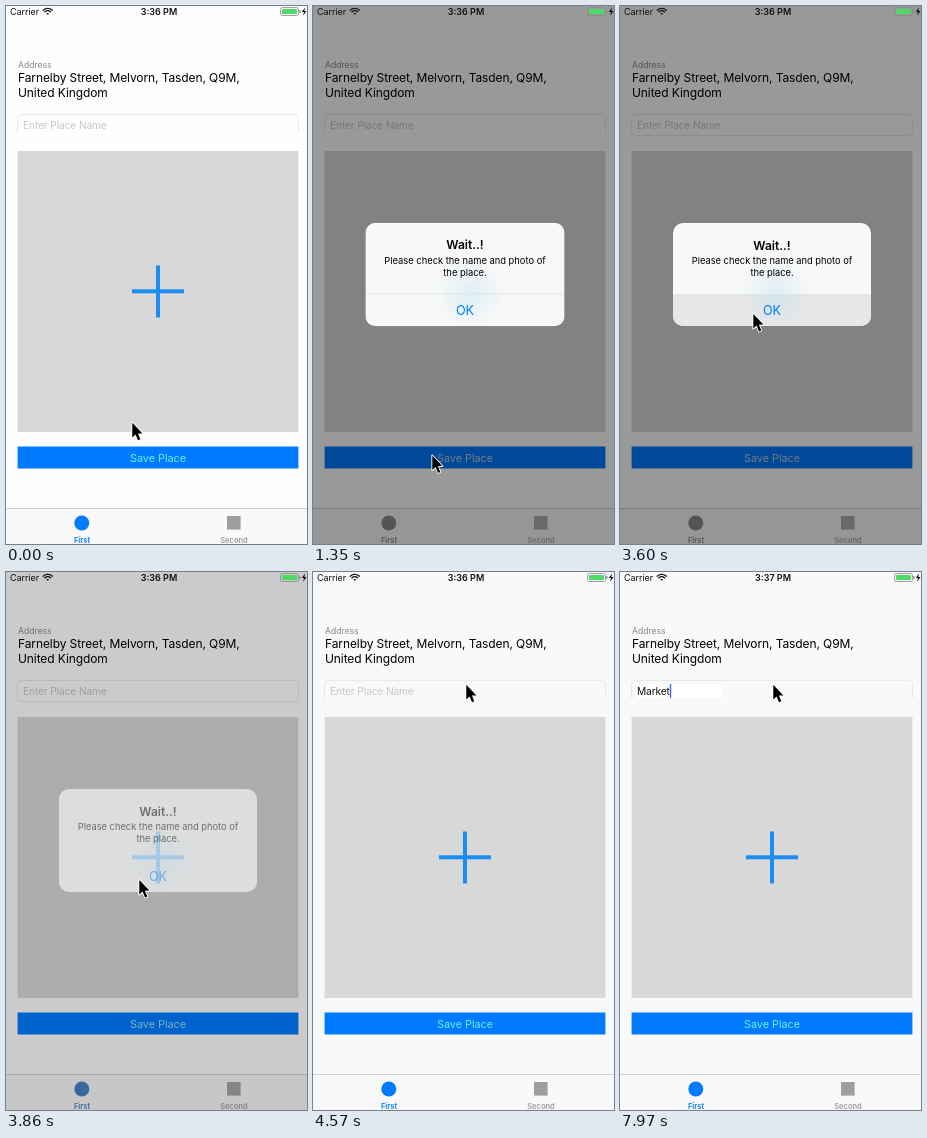
Write an HTML page with a canvas that moves like this. It is 301 by 538 pixels and loops after 8000 ms.

```html
<!DOCTYPE html>
<html lang="en">
<head>
<meta charset="utf-8">
<title>Save place form</title>
<style>
html, body { margin: 0; width: 100%; height: 100%; overflow: hidden; background: #fff; }
canvas { display: block; width: 301px; height: 538px; }
</style>
</head>
<body>
<canvas id="stage"></canvas>
<script>
const W = 301, H = 538, LOOP = 8000, TICK = 87;
const FONT = 'Inter, "Liberation Sans", sans-serif';
const PRESS = 900, OPEN = 1350, OK_DOWN = 3600, CLOSE = 3860, CLOSED = 4040;
const FOCUS = 5110, MINUTE = 6370;
const WORD = 'Market', KEYS = [6550, 6910, 7170, 7440, 7520, 7970];

// Pointer: each move starts where the last one ended
const HOME = { x: 125.8, y: 416.8 };
const MOVES = [
  { start: 90, steps: 6, via: { x: 126, y: 437 }, to: { x: 118.8, y: 449.5 } },
  { start: 2250, steps: 5, via: { x: 109, y: 370 }, to: { x: 132.8, y: 308 } },
  { start: 4220, steps: 5, via: { x: 135, y: 180 }, to: { x: 152.8, y: 112.8 } }
];

const canvas = document.getElementById('stage');
const dpr = window.devicePixelRatio || 1;
canvas.width = W * dpr;
canvas.height = H * dpr;
const ctx = canvas.getContext('2d');

const clamp = v => Math.max(0, Math.min(1, v));
const ease = x => x * x * (3 - 2 * x);
const mix = (a, b, k) => `rgb(${a.map((v, i) => Math.round(v + (b[i] - v) * k))})`;

function rect(x, y, w, h, color) {
  ctx.fillStyle = color;
  ctx.fillRect(x, y, w, h);
}

function round(x, y, w, h, r) {
  ctx.beginPath();
  ctx.roundRect(x, y, w, h, r);
}

function poly(points) {
  ctx.beginPath();
  points.forEach(p => ctx.lineTo(p[0], p[1]));
  ctx.closePath();
}

function setFont(size, weight = 400, gap = 0) {
  ctx.font = `${weight} ${size}px ${FONT}`;
  ctx.letterSpacing = gap + 'px';
}

function text(s, x, y, size, color, { weight, align = 'left', gap } = {}) {
  setFont(size, weight, gap);
  ctx.textAlign = align;
  ctx.fillStyle = color;
  ctx.fillText(s, x, y);
}

function pointerAt(t) {
  let pos = HOME;
  for (const { start, steps, via, to } of MOVES) {
    if (t < start) break;
    const n = Math.min(steps, Math.floor((t - start) / TICK) + 1);
    const u = ease(n / steps), v = 1 - u, from = pos;
    const along = k => v * v * from[k] + 2 * u * v * via[k] + u * u * to[k];
    pos = { x: along('x'), y: along('y') };
  }
  return pos;
}

// How much of the alert is present, 0 to 1
function presence(t) {
  if (t < OPEN || t >= CLOSED) return 0;
  if (t < CLOSE) return 1;
  const step = Math.floor((t - CLOSE) / 90) + 1;
  return (1 - step / 3) ** 1.7;
}

// Shown on focus, one soft blink, then solid while typing
function caretAlpha(t) {
  return t < FOCUS ? 0 : clamp((Math.abs(t - 5875) - 180) / 90);
}

function drawStatus(t) {
  const ink = '#111', frame = '#888';
  text('Carrier', 4, 9, 9, ink, { gap: -0.05 });
  text(t < MINUTE ? '3:36 PM' : '3:37 PM', 153, 9, 9, ink, { weight: 600, align: 'center' });

  ctx.strokeStyle = ctx.fillStyle = ink;
  ctx.lineWidth = 1.4;
  for (const r of [1.3, 4.2, 6.6]) {
    ctx.beginPath();
    ctx.arc(41.7, 9, r, -Math.PI * 0.77, -Math.PI * 0.23);
    ctx.stroke();
  }

  round(274.5, 1.5, 18, 8, 2);
  ctx.lineWidth = 0.8;
  ctx.strokeStyle = frame;
  ctx.stroke();
  round(276, 3, 15, 5, 1);
  ctx.fillStyle = '#4cd964';
  ctx.fill();
  rect(293.3, 4, 1.2, 3, frame);
  poly([[299, 1.5], [295.8, 6], [298, 6], [297, 9.8], [300.6, 5], [298.4, 5]]);
  ctx.fillStyle = ink;
  ctx.fill();
}

function drawField(t) {
  const closed = t >= OK_DOWN && t < CLOSED;
  ctx.save();
  ctx.beginPath();
  ctx.rect(0, 100, W, closed ? 40 : 27);
  ctx.clip();
  round(11.5, 108.5, 281, 21, 4);
  ctx.lineWidth = 1;
  ctx.strokeStyle = '#e9e9e9';
  ctx.stroke();
  ctx.restore();

  const size = 10.2, gap = -0.12, base = 122.7;
  const typed = WORD.slice(0, KEYS.filter(k => t >= k).length);
  if (typed) {
    rect(16, 112, 85, 14, '#fff');
    text(typed, 17, base, size, '#111', { gap });
  } else {
    text('Enter Place Name', 17, base, size, '#c7c7cd', { gap });
  }
  setFont(size, 400, gap);
  ctx.globalAlpha = caretAlpha(t);
  rect(17 + ctx.measureText(typed).width, 112, 1.4, 14, '#426bf2');
  ctx.globalAlpha = 1;
}

function drawTabs(dim) {
  const tint = mix([0, 122, 255], [140, 140, 140], dim);
  const idle = mix([158, 158, 158], [174, 174, 174], dim);
  const label = { weight: 600, align: 'center' };
  rect(0, 502, W, 36, '#f9f9f9');
  rect(0, 502, W, 1, '#cfcfcf');
  ctx.beginPath();
  ctx.arc(75.8, 517, 7.5, 0, Math.PI * 2);
  ctx.fillStyle = tint;
  ctx.fill();
  rect(221, 510, 13.6, 13.6, idle);
  text('First', 76, 537.2, 7.5, tint, label);
  text('Second', 228, 537.2, 7.5, idle, label);
}

function drawPage(t, dim) {
  rect(0, 0, W, H, t < CLOSED ? '#fefefe' : '#f9f9f9');
  text('Address', 12, 61.5, 8.6, '#8a8a8a');
  text('Farnelby Street, Melvorn, Tasden, Q9M,', 12, 76, 12, '#000', { gap: -0.1 });
  text('United Kingdom', 12, 90.6, 12, '#000', { gap: -0.1 });
  drawField(t);

  rect(11.6, 145, 280.8, 281, '#d8d8d8');
  rect(126, 283.3, 52, 4, '#1b8cf0');
  rect(150, 259.5, 4, 52, '#1b8cf0');

  const pressed = t >= PRESS && t < OPEN;
  const label = pressed ? '#3395ff' : mix([104, 240, 255], [190, 206, 214], dim);
  rect(11.6, 440.5, 280.8, 22, '#007aff');
  text('Save Place', 152, 455.7, 10.8, label, { align: 'center' });
  drawTabs(dim);
}

function drawAlert(t, shown) {
  const pressed = t >= OK_DOWN && t < CLOSE;
  const scale = 1 + 0.006 * clamp(1 - (t - OPEN) / 180);
  ctx.save();
  ctx.translate(152, 268.5);
  ctx.scale(scale, scale);
  ctx.translate(-152, -268.5);

  // The panel fades later than its text
  ctx.globalAlpha = 1 - (1 - shown) ** 1.5;
  ctx.save();
  round(53, 217, 198, 103, 10);
  ctx.clip();
  rect(53, 217, 198, 103, '#f8f8f8');
  if (pressed) rect(53, 288, 198, 32, '#e7e7e7');
  const glow = ctx.createRadialGradient(156, 287, 4, 156, 287, 36);
  glow.addColorStop(0, 'rgba(150,215,240,0.24)');
  glow.addColorStop(1, 'rgba(150,215,240,0)');
  rect(53, 217, 198, 103, glow);
  if (t < OK_DOWN) rect(53, 287.5, 198, 0.8, '#dcdfe0');
  ctx.restore();

  ctx.globalAlpha = shown;
  const align = 'center';
  text('Wait..!', 152, 243.6, 12, '#000', { weight: 600, align });
  text('Please check the name and photo of', 152, 258, 9.3, '#000', { align });
  text('the place.', 152, 270, 9.3, '#000', { align });
  text('OK', 152, 308.8, 12.6, '#007aff', { align });
  ctx.restore();
}

function drawPointer({ x, y }) {
  ctx.save();
  ctx.translate(x, y);
  poly([[0.5, 0], [0.5, 14.6], [3.8, 11.6], [6.2, 17.4], [8.5, 16.4], [6.1, 10.8], [10.6, 10.6]]);
  ctx.lineJoin = 'round';
  ctx.lineWidth = 1.8;
  ctx.strokeStyle = '#fff';
  ctx.stroke();
  ctx.fillStyle = '#000';
  ctx.fill();
  ctx.restore();
}

function draw(t) {
  const shown = presence(t);
  ctx.setTransform(dpr, 0, 0, dpr, 0, 0);
  drawPage(t, shown);
  if (shown) {
    rect(0, 0, W, H, `rgba(0,0,0,${0.4 * shown})`);
    drawAlert(t, shown);
  }
  drawStatus(t);
  drawPointer(pointerAt(t));
}

const begin = performance.now();
function frame() {
  draw((performance.now() - begin) % LOOP);
  requestAnimationFrame(frame);
}
frame();
</script>
</body>
</html>
```
